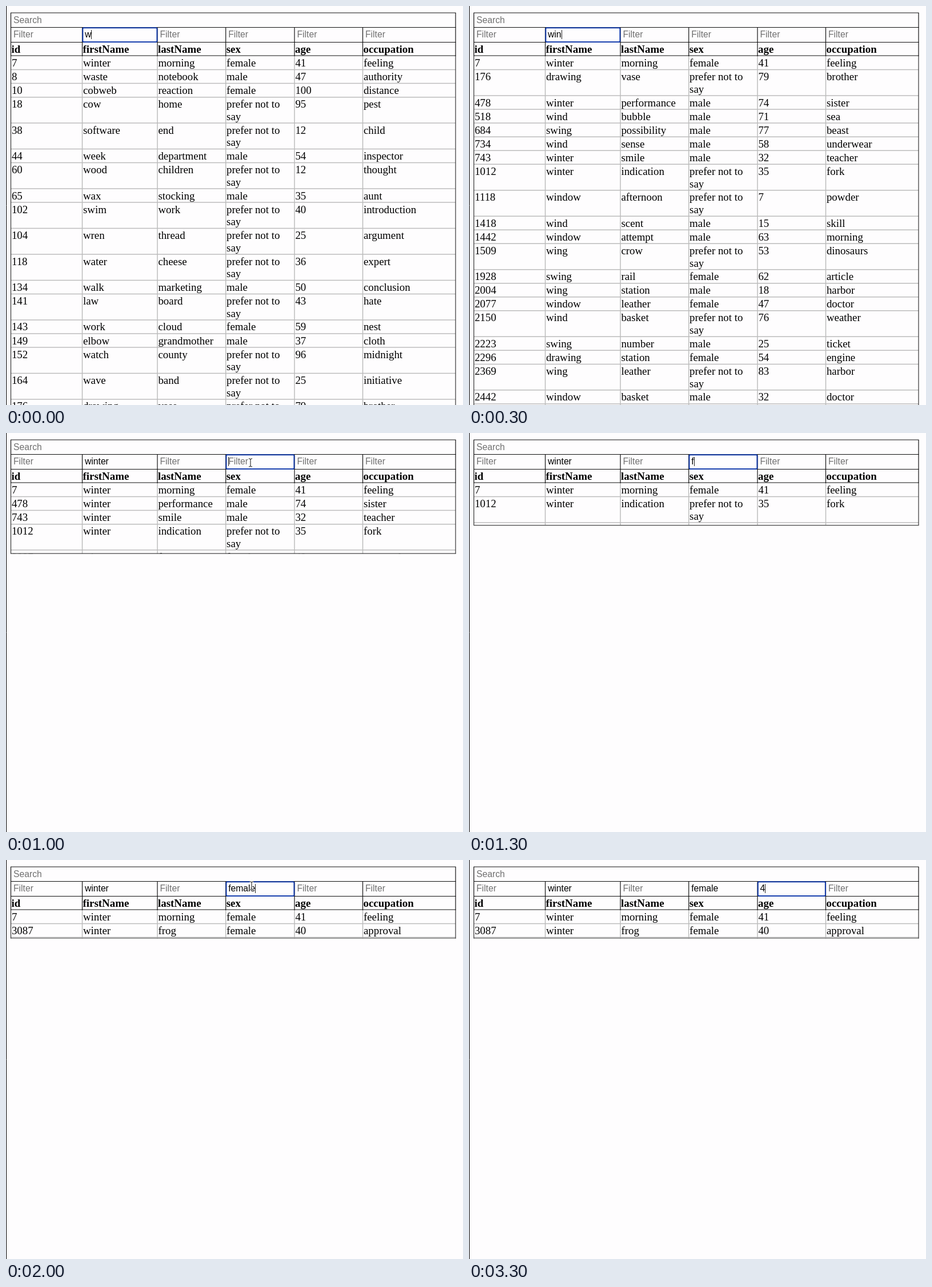
Animation, 800 px wide and 699 px high, one loop 3.4 s. Source, as an HTML page with a canvas:

```html
<!DOCTYPE html>
<html lang="en">
<head>
<meta charset="utf-8">
<title>Table filter</title>
<style>
html, body { margin: 0; width: 100%; height: 100%; overflow: hidden; background: #fefdfe; }
canvas { display: block; }
</style>
</head>
<body>
<canvas id="stage" width="800" height="699"></canvas>
<script>
const ctx = document.getElementById('stage').getContext('2d');
const LOOP = 3400, STEP = 100;
const SERIF = '"Liberation Serif", Times, serif', SANS = '"Liberation Sans", Arial, sans-serif';
const FIELD = '15.7px ' + SANS;
const COLS = [8.5, 133.5, 265, 384.7, 505, 624.5], RIGHT = 787;
const HEAD = ['id', 'firstName', 'lastName', 'sex', 'age', 'occupation'];
const TOP = 88, SINGLE = 24.05, DOUBLE = 45.45, ESTIMATE = 24.7;
const SEX = { f: 'female', m: 'male', p: 'prefer not to say' };

const rows = `7 winter morning f 41 feeling
8 waste notebook m 47 authority
10 cobweb reaction f 100 distance
18 cow home p 95 pest
38 software end p 12 child
44 week department m 54 inspector
60 wood children p 12 thought
65 wax stocking m 35 aunt
102 swim work p 40 introduction
104 wren thread p 25 argument
118 water cheese p 36 expert
134 walk marketing m 50 conclusion
141 law board p 43 hate
143 work cloud f 59 nest
149 elbow grandmother m 37 cloth
152 watch county p 96 midnight
164 wave band p 25 initiative
176 drawing vase p 79 brother
246 swim football f 93 belief
268 wish coat p 79 crayon
478 winter performance m 74 sister
518 wind bubble m 71 sea
681 wish vacation f 97 grape
684 swing possibility m 77 beast
734 wind sense m 58 underwear
743 winter smile m 32 teacher
1012 winter indication p 35 fork
1044 swim tomatoes f 68 agreement
1118 window afternoon p 7 powder
1418 wind scent m 15 skill
1442 window attempt m 63 morning
1509 wing crow p 53 dinosaurs
1915 wife chair p 53 discovery
1928 swing rail f 62 article
1957 wife river m 28 garden`.split('\n').map(line => line.split(' '));

// Further matches that fill the list below the fold
const pick = (words, i) => words.split(' ')[i % words.split(' ').length];
for (let i = 0; i < 14; i++) {
  rows.push([2004 + i * 73, pick('wing window wind swing drawing', i), pick('station leather basket number', i),
    pick('m f p', i), 18 + i * 29 % 80, pick('harbor doctor weather ticket engine', i)].map(String));
}
rows.push('3087 winter frog f 40 approval'.split(' '));
rows.forEach(row => row[3] = SEX[row[3]]);

// Pointer path: step, x, y
const sweeps = [
  [[7, 330, 165], [8, 370, 120], [9, 410, 72], [10, 428, 52], [12, 430, 48]],
  [[19, 430, 45], [20, 430, 45], [21, 452, 38], [22, 490, 40], [23, 525, 46], [24, 541, 51], [30, 541, 51]]
];

const clamp = (v, lo, hi) => Math.min(hi, Math.max(lo, v));

function line(x1, y1, x2, y2, color, width = 1.2) {
  ctx.strokeStyle = color;
  ctx.lineWidth = width;
  ctx.beginPath();
  ctx.moveTo(x1, y1);
  ctx.lineTo(x2, y2);
  ctx.stroke();
}

function text(s, x, y, font, color = '#000') {
  ctx.font = font;
  ctx.fillStyle = color;
  ctx.fillText(s, x, y);
}

function drawBody(filters) {
  const found = rows.filter(row => filters.every((f, i) => row[i].includes(f)));
  const bottom = TOP + found.length * ESTIMATE, font = '18.9px ' + SERIF;
  ctx.save();
  ctx.beginPath();
  ctx.rect(0, TOP, 800, bottom - TOP);
  ctx.clip();
  COLS.slice(1).forEach(x => line(x, TOP, x, bottom, '#bcbcbc', 1.5));
  let y = TOP;
  for (const row of found) {
    if (y > 699) break;
    const wraps = row[3] === SEX.p;
    row.forEach((cell, i) => {
      const x = COLS[i] + 1.4;
      text(wraps && i === 3 ? 'prefer not to' : cell, x, y + 18, font);
      if (wraps && i === 3) text('say', x, y + 39.8, font);
    });
    y += wraps ? DOUBLE : SINGLE;
    line(9, y - .5, RIGHT, y - .5, '#bcbcbc', 1.5);
  }
  ctx.restore();
  line(8.5, TOP, 8.5, bottom, '#333');
  line(RIGHT, TOP, RIGHT, bottom, '#333');
  line(8, bottom - .4, RIGHT + .5, bottom - .4, '#444');
}

function drawHead(filters, focus, caret) {
  [12, 37.5, 63.5, 87].forEach(y => line(8, y, RIGHT + .5, y, '#111'));
  line(8.5, 12, 8.5, 88, '#111');
  line(RIGHT, 12, RIGHT, 88, '#111');
  COLS.slice(1).forEach(x => line(x, 38, x, 88, '#111'));
  text('Search', 13, 30, FIELD, '#707070');
  COLS.forEach((x, i) => {
    text(filters[i] || 'Filter', x + 4.5, 55.3, FIELD, filters[i] ? '#000' : '#707070');
    text(HEAD[i], x + 1, 81.5, 'bold 18.9px ' + SERIF);
  });
  const x = COLS[focus];
  ctx.strokeStyle = '#173fae';
  ctx.lineWidth = 2;
  ctx.beginPath();
  ctx.roundRect(x + .8, 38.3, COLS[focus + 1] - x - 1.4, 24.6, 2);
  ctx.stroke();
  if (caret) {
    ctx.font = FIELD;
    const cx = Math.round(x + 4.5 + ctx.measureText(filters[focus]).width) + .5;
    line(cx, 42, cx, 58, '#222', 1);
  }
}

function drawPointer(step) {
  const path = sweeps.find(p => step >= p[0][0] && step <= p[p.length - 1][0]);
  if (!path) return;
  const k = Math.max(1, path.findIndex(p => p[0] >= step));
  const [a, b] = [path[k - 1], path[k]], u = (step - a[0]) / (b[0] - a[0]);
  const x = a[1] + (b[1] - a[1]) * u, y = a[2] + (b[2] - a[2]) * u;
  for (const [color, width] of [['#fff', 3], ['#333', 1.2]]) {
    line(x, y - 6, x, y + 6, color, width);
    for (const s of [-1, 1]) {
      line(x, y + 6 * s, x - 3, y + 7.5 * s, color, width);
      line(x, y + 6 * s, x + 3, y + 7.5 * s, color, width);
    }
  }
}

function draw(now) {
  const step = Math.floor(now % LOOP / STEP);
  const first = 'winter'.slice(0, step < 1 ? 1 : clamp(step, 2, 6));
  const sex = 'female'.slice(0, clamp(step - 12, 0, 6));
  const age = step >= 31 ? '4' : '';
  const filters = ['', first, '', sex, age, ''];
  const focus = step < 10 ? 1 : step < 26 ? 3 : 4;
  ctx.fillStyle = '#fefdfe';
  ctx.fillRect(0, 0, 800, 699);
  line(.5, 0, .5, 699, '#000', 1);
  drawBody(filters);
  drawHead(filters, focus, focus < 4 || age);
  drawPointer(step);
  requestAnimationFrame(tick);
}

const start = performance.now();
function tick() { draw(performance.now() - start); }
tick();
</script>
</body>
</html>
```
